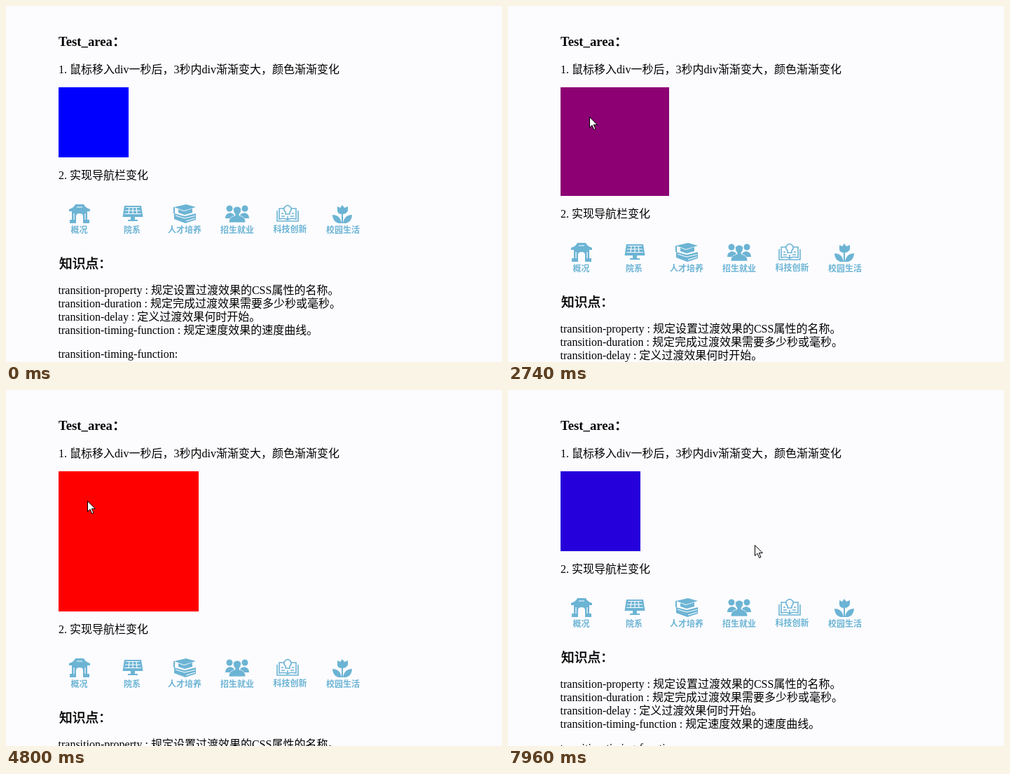
An HTML page for the animation above (8000 ms loop, 708 by 508 pixels).

```html
<!DOCTYPE html>
<html lang="zh-CN">
<head>
<meta charset="utf-8">
<title>CSS transition</title>
<style>
html, body { margin: 0; width: 100%; height: 100%; overflow: hidden; background: #fcfcff; }
svg { display: block; }
text { font: 16px "Liberation Serif", "Noto Sans CJK SC", "Noto Sans CJK", serif; text-spacing-trim: space-all; white-space: pre; }
.head { font-size: 18.72px; font-weight: bold; }
.sub { font-size: 18.72px; stroke: #000; stroke-width: .5; }
.nav { fill: #6cb4d4; }
.nav text { font: bold 12px "Noto Sans CJK SC", "Noto Sans CJK", sans-serif; text-anchor: middle; }
.line { fill: none; stroke: #6cb4d4; stroke-width: 1.6; }
.gap { fill: none; stroke: #fcfcff; stroke-width: 1.2; }
</style>
</head>
<body>
<svg width="708" height="508" viewBox="0 0 708 508">
  <text class="head" x="75" y="57">Test_area：</text>
  <text x="75" y="96">1. 鼠标移入div一秒后，3秒内div渐渐变大，颜色渐渐变化</text>
  <rect id="box" x="75" y="116" shape-rendering="crispEdges"/>
  <g id="below">
    <text x="75" y="247">2. 实现导航栏变化</text>
    <g class="nav">
      <g transform="translate(105 283)">
        <path d="M-6 0H6Q8 5 15 7V10H-15V7Q-8 5 -6 0ZM-11 10H11V22H14V27H5V17Q5 13 0 13Q-5 13 -5 17V27H-14V22H-11Z"/>
        <path class="gap" d="M-4 4H4M-8 13V22M8 13V22"/>
        <text x="-.5" y="41">概况</text>
      </g>
      <g transform="translate(181 283)">
        <path d="M-12 2H12L14.5 18H-14.5ZM-3 18H3V22H7V24H-7V22H-3Z"/>
        <path class="gap" d="M-10 4.5H10M-11 9H11M-12 13.5H12M-5 4L-6 14M0 4V14M5 4L6 14"/>
        <text x="-1" y="41">院系</text>
      </g>
      <g transform="translate(255 283)">
        <path d="M-15 4L2 0L16 4L-1 9ZM-9 7L-1 10L11 6V12L0 15L-9 12ZM-16 4H-14V13H-16Z"/>
        <path d="M-15 13L0 17L16 13V22L1 27L-15 21Z"/>
        <path class="gap" d="M-13 16L0 20L15 16.5M2 24L15 20"/>
        <text y="41">人才培养</text>
      </g>
      <g transform="translate(330 283)">
        <circle cx="-11" cy="6" r="4.5"/><circle cx="11" cy="6" r="4.5"/>
        <path d="M-17 20Q-17 13 -10 12Q-3 13 -3 20ZM17 20Q17 13 10 12Q3 13 3 20Z"/>
        <path d="M-12 26Q-12 18 -3 16V14Q-6 11 -5.5 6Q0 0 5.5 6Q6 11 3 14V16Q12 18 12 26Z" stroke="#fcfcff" stroke-width=".7"/>
        <text y="41">招生就业</text>
      </g>
      <g transform="translate(402 283)">
        <path class="line" d="M-6 6H-12V21Q-4 19 0 22Q4 19 12 21V6H6M0 17V22M-15 9V24H15V9"/>
        <path class="line" d="M-3 14V11Q-6 8 -5 5Q0 -2 5 5Q6 8 3 11V14ZM-9 13H-6M-9 17H-4M9 13H6M9 17H4"/>
        <text x="3.5" y="40">科技创新</text>
      </g>
      <g transform="translate(480 283)">
        <path d="M-7 3L-3 5L0 1L3 5L8 3V9Q6 14 0 14Q-7 14 -7 9ZM-1 13H1V27H-1Z"/>
        <path d="M-14 15Q-3 15 -1 27Q-13 28 -14 15ZM14 15Q3 15 1 27Q13 28 14 15Z"/>
        <text x="1" y="41">校园生活</text>
      </g>
    </g>
    <text class="sub" x="76" y="373.5">知识点：</text>
    <text x="74.5" y="411">transition-property : 规定设置过渡效果的CSS属性的名称。</text>
    <text x="74.5" y="430">transition-duration : 规定完成过渡效果需要多少秒或毫秒。</text>
    <text x="74.5" y="449">transition-delay : 定义过渡效果何时开始。</text>
    <text x="74.5" y="468">transition-timing-function : 规定速度效果的速度曲线。</text>
    <text x="74.5" y="502">transition-timing-function:</text>
  </g>
  <path id="cursor" d="M.5 .5V15.5L4 12.2L6.8 18.5L9 17.5L6.3 11.5H11.3Z" fill="#fff" stroke="#000"/>
</svg>
<script>
const LOOP = 8000;
const [box, below, cursor] = ["box", "below", "cursor"].map(id => document.getElementById(id));
const span = (t, from, to) => Math.min(1, Math.max(0, (t - from) / (to - from)));
const smooth = u => u * u * (3 - 2 * u);

// CSS "ease": cubic-bezier(.25, .1, .25, 1)
function ease(x) {
  let lo = 0, hi = 1;
  for (let i = 0; i < 24; i++) {
    const m = (lo + hi) / 2;
    if (.75 * m * (1 - m) + m ** 3 < x) lo = m; else hi = m;
  }
  return .3 * lo * (1 - lo) ** 2 + 3 * (1 - lo) * lo * lo + lo ** 3;
}

function pointer(t) {
  const enter = smooth(span(t, 110, 930));
  const leave = 1 - (1 - span(t, 5010, 5560)) ** 1.4;
  const back = smooth(span(t, 7560, 7960));
  return [165 - 49 * enter + 267 * leave - 31 * back,
          487 - 329 * enter + 48 * leave + 15 * back].map(Math.round);
}

function draw(t) {
  const p = t < 6280 ? ease(span(t, 1739, 4881)) : 1 - ease(span(t, 6280, 9280));
  const size = Math.round(100 + 100 * p);
  box.setAttribute("width", size);
  box.setAttribute("height", size);
  box.setAttribute("fill", `rgb(${Math.round(255 * p)},0,${Math.round(255 * (1 - p))})`);
  below.setAttribute("transform", `translate(0 ${size - 100})`);
  cursor.setAttribute("transform", `translate(${pointer(t)})`);
  cursor.setAttribute("visibility", t < 130 ? "hidden" : "visible");
}

function tick() {
  draw(performance.now() % LOOP);
  requestAnimationFrame(tick);
}
tick();
</script>
</body>
</html>
```
